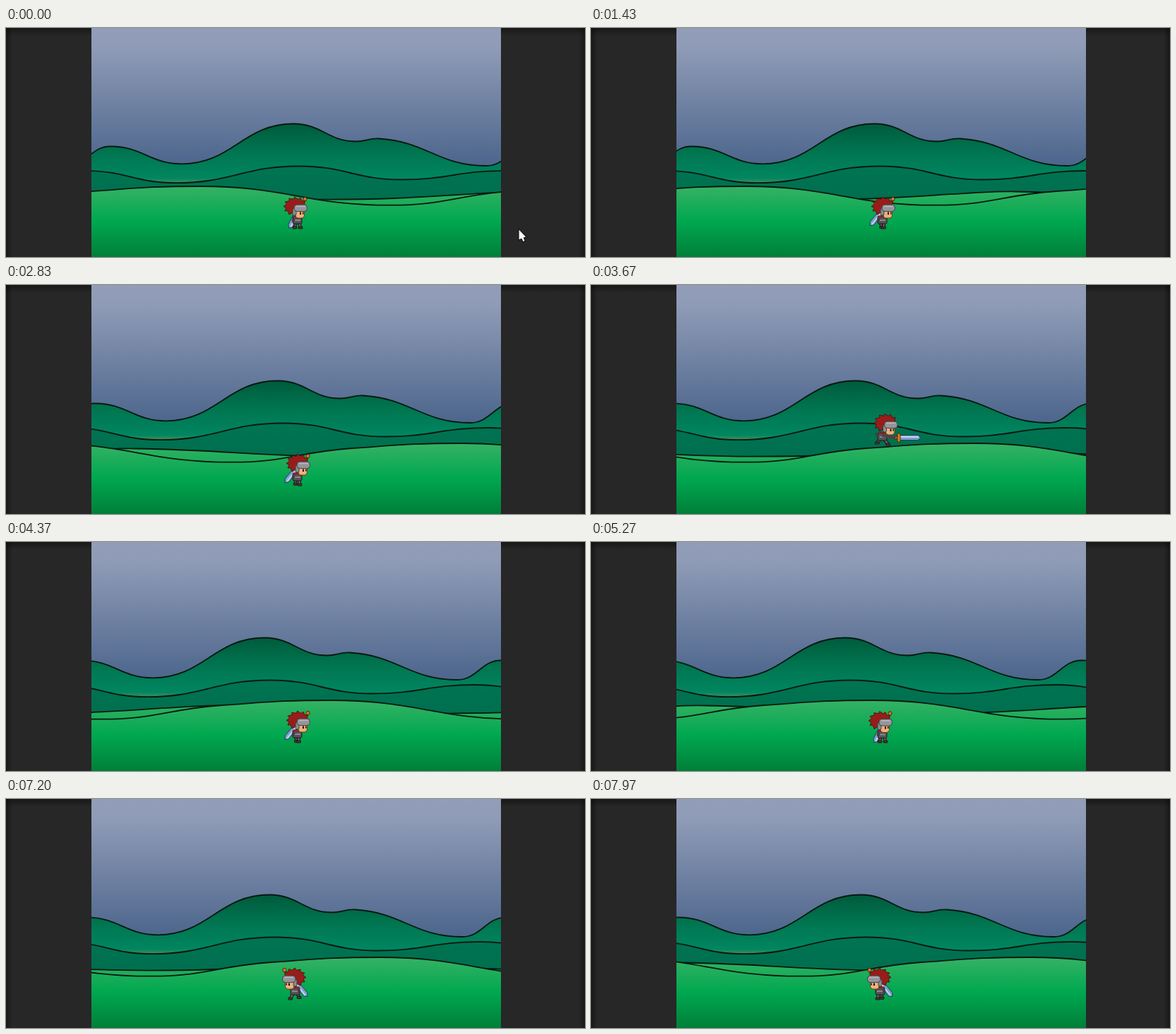
An HTML page with a canvas that plays this animation: 820x324 px, repeating every 8000 ms.

```html
<!DOCTYPE html>
<html lang="en">
<head>
<meta charset="utf-8">
<title>Knight in the hills</title>
<style>
html, body { margin: 0; width: 100%; height: 100%; overflow: hidden; background: #272727; }
canvas { display: block; }
</style>
</head>
<body>
<canvas id="stage" width="820" height="324"></canvas>
<script>
const ctx = document.getElementById('stage').getContext('2d');
const W = 820, H = 324, LEFT = 121, RIGHT = 701;
const LOOP = 8000, SPEED = 0.12, STEP = 125, TILE = 594;
const RUN = { start: 960, stop: 4880, back: 6110 };
const JUMP = { apex: 3660, half: 530, height: 57, end: 4205 };
const SLASH = { start: 3460, end: 3900 };
const CURSOR_GONE = 370;
const OUTLINE = '#1c1214';

function gradient(x0, y0, x1, y1, stops) {
  const g = ctx.createLinearGradient(x0, y0, x1, y1);
  stops.forEach(([at, color]) => g.addColorStop(at, color));
  return g;
}
const vertical = (y0, y1, stops) => gradient(0, y0, 0, y1, stops);

const sky = vertical(0, 196, [[0, '#929db8'], [0.13, '#909cb7'], [1, '#4c658c']]);
const grass = vertical(222, H, [[0, '#38b265'], [0.5, '#00a850'], [1, '#007f39']]);

// Ridge keys are crests and valleys: x, y and, where not level, the slope.
const ridges = [
  {
    rate: 0.1,
    fill: vertical(135, 219, [[0, '#005a3c'], [0.45, '#00744f'], [0.92, '#008660'], [1, '#468a5a']]),
    keys: [[148, 167.5], [249, 192.3], [407, 135.5], [496, 160.5], [528, 156.5, 0.06], [680, 195]]
  },
  {
    rate: 0.1,
    fill: vertical(195, 242, [[0, '#007451'], [1, '#006f4f']]),
    keys: [[112, 202], [241, 219.2], [415, 195.5], [560, 214.5]]
  },
  {
    rate: 2.5,
    fill: grass,
    keys: [[120, 231.7, -0.05], [150, 231.5, 0.015], [455, 242.6]]
  },
  {
    rate: 1,
    fill: grass,
    keys: [[121, 231, -0.07], [275, 224], [545, 250.7]]
  }
];

function drawRidge({ keys, rate, fill }, scroll) {
  const n = keys.length;
  const shift = (scroll * rate) % TILE;
  const keyAt = i => {
    const [x, y, slope = 0] = keys[i % n];
    return { x: x + (Math.floor(i / n) - 1) * TILE - shift, y, slope };
  };
  let from = keyAt(0);
  ctx.beginPath();
  ctx.moveTo(from.x, H + 10);
  ctx.lineTo(from.x, from.y);
  for (let i = 1; i <= 4 * n; i++) {
    const to = keyAt(i);
    const reach = (to.x - from.x) * 0.45;
    ctx.bezierCurveTo(from.x + reach, from.y + from.slope * reach,
      to.x - reach, to.y - to.slope * reach, to.x, to.y);
    from = to;
  }
  ctx.lineTo(from.x, H + 10);
  paint(fill, '#08180f', 1.8);
}

function paint(fill, stroke = OUTLINE, width = 0.9) {
  ctx.fillStyle = fill;
  ctx.fill();
  ctx.strokeStyle = stroke;
  ctx.lineWidth = width;
  ctx.stroke();
}

function box(x, y, w, h, radius, fill, stroke) {
  ctx.beginPath();
  ctx.roundRect(x, y, w, h, radius);
  paint(fill, stroke);
}

function line(x0, y0, x1, y1, color, width) {
  ctx.beginPath();
  ctx.moveTo(x0, y0);
  ctx.lineTo(x1, y1);
  ctx.strokeStyle = color;
  ctx.lineWidth = width;
  ctx.stroke();
}

function drawSword(x, y, angle) {
  ctx.save();
  ctx.translate(x, y);
  ctx.rotate(angle);
  ctx.beginPath();
  ctx.moveTo(3, -3.5);
  ctx.lineTo(29, -3.5);
  ctx.lineTo(33, 0);
  ctx.lineTo(29, 3.5);
  ctx.lineTo(3, 3.5);
  ctx.closePath();
  paint('#7a9fcf', '#28374d');
  line(4, -1, 30, -1, '#bcd5ec', 2);
  box(-4, -2, 5, 4, 1, '#c8551c', '#4a2408');
  box(0, -6, 4, 12, 1, '#d98220', '#4a2408');
  ctx.restore();
}

function drawLeg(hip, foot, lift, color) {
  line(hip, -9, foot, -2 - lift, OUTLINE, 4.5);
  line(hip, -9, foot, -2 - lift, color, 2.5);
  box(foot - 3, -3 - lift, 6, 3, 1, '#4b3732');
}

// A ring of alternating tips and notches, swept from the nape over to the brow.
function drawHair() {
  const points = 17;
  ctx.beginPath();
  for (let i = 0; i < points; i++) {
    const tip = i % 2;
    const angle = Math.PI * (0.62 + 1.27 * i / (points - 1)) + (tip ? -0.06 : 0.06);
    const size = tip ? 1 : 0.78;
    ctx.lineTo(3 + 17 * size * Math.cos(angle), -31.5 + 13.5 * size * Math.sin(angle));
  }
  ctx.closePath();
  paint('#981d1a', '#4d0d0d');
}

function drawHead() {
  drawHair();
  box(3, -28, 12.5, 13, 4, '#eeb07a', '#5a3020');
  box(-1, -29, 5, 10, 2, '#8b8c91', '#39383c');
  box(1, -34, 18.5, 9.5, 4, '#94959a', '#39383c');
  line(4, -31.5, 17, -31.5, '#b6b7bb', 1.5);
  ctx.fillStyle = OUTLINE;
  ctx.fillRect(9, -23.5, 2, 3.5);
  ctx.fillRect(13, -23.5, 1.5, 3);
}

function drawBody(attack) {
  box(-5, -18, 13, 11, 2, '#555257');
  line(-2, -12, 6, -12, '#89868b', 2);
  line(-4, -17, 8, -17, '#8f211d', 2.5);
  if (attack) {
    line(1, -14, 21, -11, '#48454a', 4);
    drawSword(23, -11, 0);
  }
  line(-3, -15, attack ? -8 : -5, attack ? -17 : -10, '#3f3c41', 3.5);
}

function drawKnight({ running, facing, lift, attack, phase }) {
  const turn = phase * Math.PI / 2;
  const spread = running ? 4.6 + 3.6 * Math.cos(turn - 1.1) : 4;
  const sink = running ? 0 : 0.5 - 0.5 * Math.cos(turn);
  const lean = attack ? 3.5 : running ? 0 : -4;
  ctx.save();
  ctx.translate(411, 284 - lift);
  ctx.scale(facing, 1);
  ctx.lineJoin = 'round';
  if (!attack) drawSword(5, -30 + sink, running ? 2.25 : 2.04);
  drawLeg(-1, 2 - spread, running ? spread / 4 : 0, '#59555a');
  drawLeg(4, 2 + spread, 0, '#6b666b');
  ctx.translate(0, sink);
  drawBody(attack);
  ctx.translate(lean, 0);
  drawHead();
  if (!attack) box(14, -44.5, 5, 5, 2, '#d9791f', '#3a1c08');
  ctx.restore();
}

function drawCursor() {
  ctx.save();
  ctx.translate(726, 284);
  line(4, 10, 8, 18.5, '#101214', 4.5);
  ctx.beginPath();
  ctx.moveTo(0, 0);
  ctx.lineTo(0, 16);
  ctx.lineTo(11, 11.5);
  ctx.closePath();
  paint('#f4f8fb', '#101214', 1.1);
  line(4, 10, 7.5, 17.5, '#f4f8fb', 2.5);
  ctx.restore();
}

function drawPanels() {
  ctx.fillStyle = '#272727';
  ctx.fillRect(0, 0, W, H);
  const stops = [[0, 'rgba(0,0,0,0.4)'], [1, 'rgba(0,0,0,0)']];
  const shades = [vertical(0, 11, stops), gradient(0, 0, 9, 0, stops), gradient(W, 0, W - 9, 0, stops)];
  for (const shade of shades) {
    ctx.fillStyle = shade;
    ctx.fillRect(0, 0, W, H);
  }
}

function knightAt(t) {
  const back = t >= RUN.back;
  const running = back || (t >= RUN.start && t < RUN.stop);
  const began = back ? RUN.back : t >= RUN.stop ? RUN.stop : t >= RUN.start ? RUN.start : 0;
  const u = (t - JUMP.apex) / JUMP.half;
  const airborne = u > -1 && t < JUMP.end;
  return {
    running,
    facing: back ? -1 : 1,
    lift: airborne ? JUMP.height * (1 - u * u) : 0,
    attack: t >= SLASH.start && t < SLASH.end,
    phase: Math.floor((t - began) / STEP) % 4
  };
}

function scrollAt(t) {
  const ahead = Math.min(Math.max(t, RUN.start), RUN.stop) - RUN.start;
  return (ahead - Math.max(0, t - RUN.back)) * SPEED;
}

function render(t) {
  drawPanels();
  ctx.save();
  ctx.beginPath();
  ctx.rect(LEFT, 0, RIGHT - LEFT, H);
  ctx.clip();
  ctx.fillStyle = sky;
  ctx.fillRect(LEFT, 0, RIGHT - LEFT, H);
  ridges.forEach(ridge => drawRidge(ridge, scrollAt(t)));
  drawKnight(knightAt(t));
  ctx.restore();
  if (t < CURSOR_GONE) drawCursor();
}

const began = performance.now();
function tick() {
  render((performance.now() - began) % LOOP);
  requestAnimationFrame(tick);
}
tick();
</script>
</body>
</html>
```
